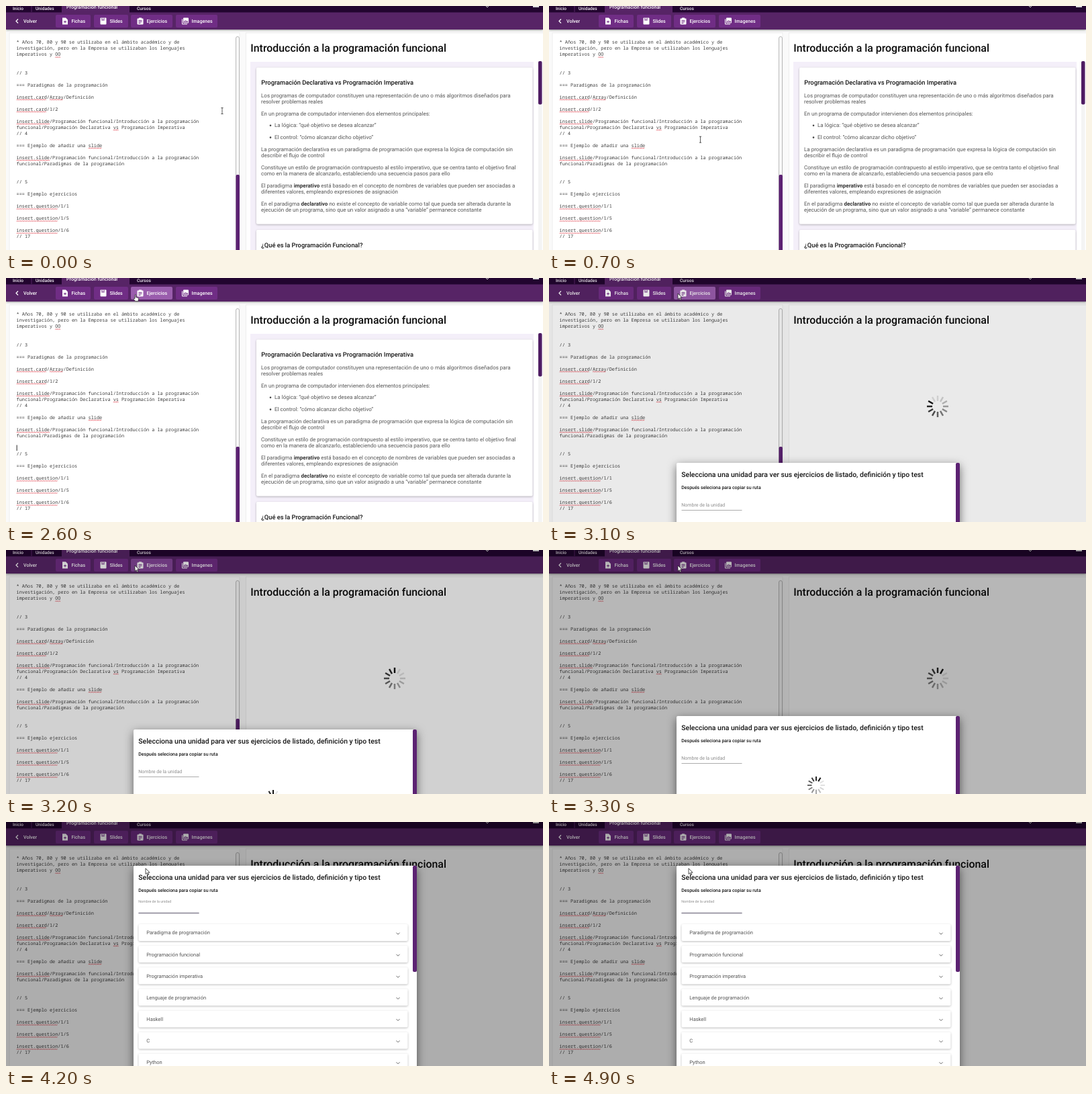
Recreate the animation shown at these times as an HTML page. Size 800 px wide and 363 px high, loop 5000 ms.

```html
<!DOCTYPE html>
<html lang="es">
<head>
<meta charset="utf-8">
<style>
html, body { margin: 0; width: 100%; height: 100%; overflow: hidden; background: #fafafa; }
svg { display: block; width: 800px; height: 363px; font-family: Roboto, sans-serif; text-rendering: geometricPrecision; }
.mono { font: 6.87px "Noto Sans Mono", monospace; fill: #3c3c3c; }
.body { font-size: 8.04px; fill: #555; }
.h2 { font-size: 9.3px; font-weight: 500; fill: #161616; }
.bar { font-size: 7.1px; font-weight: 500; fill: #fff; }
.tab { font-size: 6.6px; font-weight: 500; fill: #f4eef6; }
.item { font-size: 7.5px; fill: #555; }
.b { font-weight: 700; fill: #333; }
.card { fill: #fff; filter: drop-shadow(0 1px 1.5px #0004); }
.line { fill: none; stroke: #666; }
</style>
</head>
<body>
<svg id="stage" viewBox="0 0 800 363"></svg>
<script>
const text = (x, y, cls, s) => `<text x="${x}" y="${y}" class="${cls}">${s}</text>`;
const rect = (x, y, w, h, fill, more = '') =>
  `<rect x="${x}" y="${y}" width="${w}" height="${h}" fill="${fill}" ${more}/>`;
const card = (x, y, w, h) => rect(x, y, w, h, '#fff', 'class="card" rx="2"');

// Editor: [row, text, misspelt words]
const CHAR = 4.122, ROW = 9.03;
const slide = 'insert.slide/Programación funcional/Introducción a la programación';
const editorLines = [
  [0, '* Años 70, 80 y 90 se utilizaba en el ámbito académico y de'],
  [1, 'investigación, pero en la Empresa se utilizaban los lenguajes'],
  [2, 'imperativos y OO', 'OO'],
  [5, '// 3'],
  [7, '=== Paradigmas de la programación'],
  [9, 'insert.card/Array/Definición', 'insert.card', 'Array'],
  [11, 'insert.card/1/2', 'insert.card'],
  [13, slide, 'insert.slide'],
  [14, 'funcional/Programación Declarativa vs Programación Imperativa', 'vs'],
  [15, '// 4'],
  [17, '=== Ejemplo de añadir una slide', 'slide'],
  [19, slide, 'insert.slide'],
  [20, 'funcional/Paradigmas de la programación'],
  [23, '// 5'],
  [25, '=== Ejemplo ejercicios'],
  [27, 'insert.question/1/1', 'insert.question'],
  [29, 'insert.question/1/5', 'insert.question'],
  [31, 'insert.question/1/6', 'insert.question'],
  [32, '// 17'],
];
const squiggle = (x, y, w) => {
  let d = `M${x} ${y}`;
  for (let i = 1; i * 1.3 <= w; i++) d += `L${x + i * 1.3} ${y - i % 2}`;
  return `<path d="${d}" fill="none" stroke="#e0414c" stroke-width=".75"/>`;
};
const editor = editorLines.map(([row, s, ...typos]) => {
  const y = 56.4 + row * ROW;
  return text(15.6, y, 'mono', s) +
    typos.map(w => squiggle(15.6 + s.indexOf(w) * CHAR, y + 2.2, w.length * CHAR)).join('');
}).join('');

const article = [
  [135.8, 'Los programas de computador constituyen una representación de uno o más algoritmos diseñados para'],
  [144.8, 'resolver problemas reales'],
  [162.9, 'En un programa de computador intervienen dos elementos principales:'],
  [180.4, 'La lógica: “qué objetivo se desea alcanzar”', 1],
  [198.2, 'El control: “cómo alcanzar dicho objetivo”', 1],
  [215.8, 'La programación declarativa es un paradigma de programación que expresa la lógica de computación sin'],
  [225, 'describir el flujo de control'],
  [243, 'Constituye un estilo de programación contrapuesto al estilo imperativo, que se centra tanto el objetivo final'],
  [252.2, 'como en la manera de alcanzarlo, estableciendo una secuencia pasos para ello'],
  [270.2, 'El paradigma <tspan class="b">imperativo</tspan> está basado en el concepto de nombres de variables que pueden ser asociadas a'],
  [279.2, 'diferentes valores, empleando expresiones de asignación'],
  [297.2, 'En el paradigma <tspan class="b">declarativo</tspan> no existe el concepto de variable como tal que pueda ser alterada durante la'],
  [306.2, 'ejecución de un programa, sino que un valor asignado a una “variable” permanece constante'],
].map(([y, s, dot]) => text(dot ? 400 : 380, y, 'body', s) +
  (dot ? `<circle cx="394" cy="${y - 2.6}" r="1.3" fill="#444"/>` : '')).join('');

const button = (x, w, label, icon, id = '') =>
  rect(x, 13, w, 19, '#702d85', `rx="2" ${id && `id="${id}"`}`) +
  `<g transform="translate(${x + 9} 17.5)">${icon}</g>` + text(x + 23.4, 25, 'bar', label);
const sheet = '<path d="M1 0h5l3 3v7h-8z" fill="#fff"/>';
const stroke = d => `<path d="${d}" fill="none" stroke="#702d85"/>`;
const header =
  rect(0, 0, 800, 35, '#572466', 'style="filter:drop-shadow(0 1px 1.5px #0006)"') +
  rect(0, 0, 83, 10, '#22052f') + rect(184, 0, 616, 10, '#22052f') +
  rect(37.5, 0, 1, 9, '#572466') + rect(0, 9, 83, 1, '#3c154b') + rect(184, 9, 616, 1, '#3c154b') +
  text(10, 6.4, 'tab', 'Inicio') + text(44, 6.2, 'tab', 'Unidades') +
  text(90, 4.2, 'bar', 'Programación funcional') + text(195, 6.4, 'tab', 'Cursos') +
  '<path d="M715 0l2 2 2-2" fill="none" stroke="#ddd"/>' + rect(785, 0, 9, 2, '#ddd') +
  '<path d="M18 19.5l-3 3 3 3" fill="none" stroke="#fff" stroke-width="1.2"/>' +
  text(26, 25, 'bar', 'Volver') +
  button(74, 52, 'Fichas', sheet + stroke('M3 6h4M5 4v4')) +
  button(131, 51, 'Slides', rect(.5, 0, 9, 10, '#fff', 'rx="1"') + stroke('M3 0v4l1.5-1 1.5 1v-4')) +
  button(186, 62, 'Ejercicios', rect(.5, 1, 9, 9, '#fff', 'rx="1"') + rect(3, 0, 4, 2, '#fff') +
    stroke('M2.5 4h5M2.5 6h5M2.5 8h3'), 'exercises') +
  button(253, 62, 'Imagenes', rect(2, 0, 8, 8, '#fff', 'rx="1"') +
    '<path d="M.5 2v7.5h7.5" fill="none" stroke="#fff"/>' + stroke('M3 6.5l2-2.5 1.5 1.5 1-1 1.5 2z'));

const spinner = (id, x, y, r) => `<g id="${id}" transform="translate(${x} ${y})">` +
  Array.from({ length: 12 }, (_, i) =>
    `<path d="M0 ${-r / 2}V${-r}" transform="rotate(${i * 30})" stroke="#111" stroke-width="${r / 6.5}"/>`).join('') + '</g>';

const units = ['Paradigma de programación', 'Programación funcional', 'Programación imperativa',
  'Lenguaje de programación', 'Haskell', 'C', 'Python'];
const list = units.map((s, i) => {
  const y = 87 + i * 32.1;
  return card(197.5, y, 401, 25) + text(209.3, y + 15.4, 'item', s) +
    `<path d="M581.5 ${y + 12.7}l2.5 2.5 2.5-2.5" class="line"/>`;
}).join('');

const dialog = '<g id="dialog">' +
  rect(190, 0, 422, 420, '#fff', 'rx="2" style="filter:drop-shadow(0 4px 7px #0008)"') +
  rect(606, 0, 6, 158, '#5c2272', 'id="thumb" rx="2"') +
  '<text x="197.3" y="20.9" font-size="10.45" font-weight="500" fill="#151515">Selecciona una unidad para ver sus ejercicios de listado, definición y tipo test</text>' +
  '<text x="197.3" y="38.8" font-size="6.95" font-weight="500" fill="#151515">Después seleciona para copiar su ruta</text>' +
  '<text id="label" fill="#8c8c8c">Nombre de la unidad</text>' +
  rect(197.5, 70, 90, .8, '#999') + rect(197.5, 69.7, 90, 1.6, '#8c8797', 'id="focus"') +
  rect(197.3, 58, .8, 8.5, '#222', 'id="fieldCaret"') +
  spinner('wait2', 398, 103, 13) + `<g id="list">${list}</g></g>`;

document.getElementById('stage').innerHTML =
  rect(0, 0, 800, 363, '#fafafa') +
  rect(5, 40, 343, 330, '#fff', 'stroke="#eee"') + rect(357.5, 40, 450, 330, '#fff', 'stroke="#eee"') +
  editor + rect(15.7, 248.5, .9, 8.5, '#111', 'id="caret"') +
  rect(342.5, 45.5, 5, 330, '#f8f8f8', 'rx="2.5" stroke="#aaa" stroke-width=".8"') +
  rect(342.5, 251, 5.5, 120, '#5c2272', 'rx="2"') +
  '<text x="364.3" y="67.7" font-size="15.9" font-weight="500" fill="#0c0c0c">Introducción a la programación funcional</text>' +
  '<g id="content">' + rect(364, 83, 422, 290, '#f4eff9') + rect(793, 82, 5.5, 290, '#f4f4f4', 'rx="2"') +
  rect(793, 82, 5.5, 64.5, '#4e1c63', 'rx="2"') + card(373, 91.5, 411.5, 233) + card(373, 333, 411.5, 60) +
  text(380.3, 117.3, 'h2', 'Programación Declarativa vs Programación Imperativa') + article +
  text(380.3, 359, 'h2', '¿Qué es la Programación Funcional?') + '</g>' +
  spinner('wait1', 579, 191, 16) + header +
  rect(0, 0, 800, 363, '#000', 'id="shade"') + dialog +
  '<g id="arrow"><path d="M0 0v8.5l2-1.8 1.5 3.2 1.4-.7-1.5-3h2.7z" fill="#fff" stroke="#222" stroke-width=".8"/></g>' +
  '<g id="beam"><path d="M-1.6-4.5h3.2M0-4.5v9M-1.6 4.5h3.2" fill="none" stroke="#333" stroke-width=".8"/></g>' +
  '<g id="hand"><path d="M-.8 6V.6q.8-1.2 1.6 0V4l3.4.9q1 .5.7 1.6L4 10H0l-3-3.5q.4-1.4 2.2-.5z" fill="#fff" stroke="#222" stroke-width=".8"/></g>';

const el = id => document.getElementById(id);
const show = (id, on) => el(id).style.display = on ? '' : 'none';
const clamp = v => Math.max(0, Math.min(1, v));

// Eased interpolation through [time, ...values]
function along(keys, t) {
  const n = keys.findIndex(k => k[0] > t);
  if (n < 0) return keys[keys.length - 1].slice(1);
  if (n === 0) return keys[0].slice(1);
  const a = keys[n - 1], b = keys[n];
  const p = (t - a[0]) / (b[0] - a[0]), e = p * p * (3 - 2 * p);
  return a.slice(1).map((v, i) => v + (b[i + 1] - v) * e);
}

const mouse = [[0, 322, 156], [400, 322, 156], [1050, 105, 252], [1150, 105, 252], [1500, 134, 205],
  [1800, 134, 205], [2450, 193, 25], [3000, 192, 23], [3300, 192, 23], [3600, 206, 64], [3800, 208, 69]];

function spin(id, t) {
  const head = Math.floor((t - 3200) / 85);
  [...el(id).children].forEach((spoke, i) => {
    const age = ((head - i) % 12 + 12) % 12;
    spoke.setAttribute('opacity', Math.max(.12, 1 - age / 11));
  });
}

function draw(t) {
  const open = t >= 3100, loaded = t >= 3500;
  const [x, y] = along(mouse, t);
  const pointer = !open && y < 32 && x > 186 ? 'hand' : !open && x < 342 && y > 45 ? 'beam' : 'arrow';
  for (const id of ['arrow', 'beam', 'hand']) {
    show(id, id === pointer);
    el(id).setAttribute('transform', `translate(${x} ${y})`);
  }

  const glow = pointer === 'hand' ? 1 : open ? clamp((3300 - t) / 200) : 0;
  el('exercises').setAttribute('fill', `rgb(${112 + 42 * glow},${45 + 48 * glow},${133 + 40 * glow})`);
  show('caret', t >= 1150 && !open && Math.floor((t - 1150) / 500) % 2 === 0);

  show('content', !open);
  show('wait1', open && !loaded);
  show('wait2', open && !loaded);
  spin('wait1', t);
  spin('wait2', t);
  el('shade').setAttribute('opacity', open ? Math.min(.32, .18 + (t - 3200) * .001) : 0);

  show('dialog', open);
  const top = loaded ? 65 : along([[3100, 275], [3200, 267], [3300, 247]], t)[0];
  el('dialog').setAttribute('transform', `translate(0 ${top})`);
  el('thumb').setAttribute('height', loaded ? 158 : 330);
  show('list', loaded);

  const lift = clamp((t - 3600) / 150);
  el('label').setAttribute('font-size', 7.04 - 1.74 * lift);
  el('label').setAttribute('x', 197.3);
  el('label').setAttribute('y', 65.2 - 9.8 * lift);
  const grown = clamp((t - 3500) / 165);
  el('focus').setAttribute('width', 90 * grown);
  el('focus').setAttribute('x', 242.5 - 45 * grown);
  show('fieldCaret', loaded && Math.floor((t - 3400) / 500) % 2 === 0);
}

function tick(now) {
  draw(now % 5000);
  requestAnimationFrame(tick);
}
draw(0);
requestAnimationFrame(tick);
</script>
</body>
</html>
```
